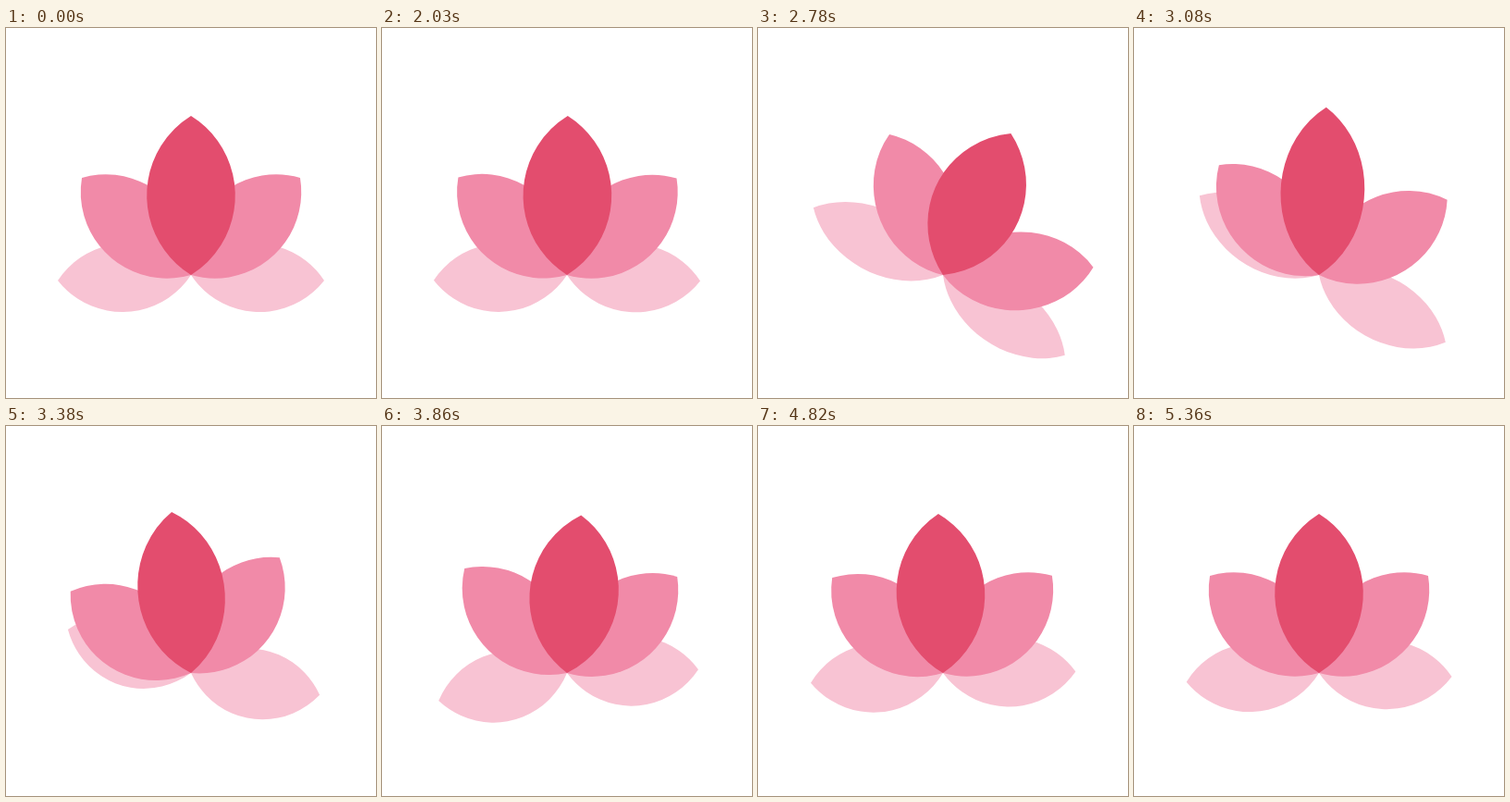
An HTML page with a canvas for the animation above (5390 ms loop, 400 by 400 pixels).

```html
<!DOCTYPE html>
<html lang="en">
<head>
<meta charset="utf-8">
<title>Lotus</title>
<style>
  html, body { margin: 0; width: 100%; height: 100%; overflow: hidden; background: #fff; }
  canvas { display: block; width: 400px; height: 400px; }
</style>
</head>
<body>
<canvas id="stage" width="400" height="400"></canvas>
<script>
const ctx = document.getElementById('stage').getContext('2d');
const LOOP = 5390, REST = 2030, STEP = 30;
const HEAD_START = 40, BEAT = 520, SETTLE = 900;
const BASE = { x: 200, y: 267 };

function ease(from, to, progress) {
  return from + (to - from) * (1 - Math.cos(Math.PI * progress)) / 2;
}

// One push to a peak, then a bounce that swings back and forth, fading to rest.
function swing({ peak, peakAt, bounce, bounceAt, decay, beat = BEAT }) {
  return time => {
    if (time < peakAt) return ease(0, peak, time / peakAt);
    if (time < bounceAt) return ease(peak, bounce, (time - peakAt) / (bounceAt - peakAt));
    const beats = (time - bounceAt) / beat;
    const count = Math.min(Math.floor(beats), 2);
    const from = bounce * (-decay) ** count;
    if (count < 2) return ease(from, -decay * from, beats - count);
    return ease(from, 0, Math.min(1, (beats - 2) * beat / SETTLE));
  };
}

const low = {
  color: '#f8c3d3', length: 144.1, bulge: 37,
  stretch: swing({ peak: 0.1, peakAt: 920, bounce: -0.04, bounceAt: 1540, decay: 0.4, beat: 700 })
};
const middle = {
  color: '#f18aa8', length: 158, bulge: 43.6,
  stretch: swing({ peak: 0.03, peakAt: 840, bounce: -0.005, bounceAt: 1440, decay: 0.3 })
};
const front = {
  color: '#e34d6e', length: 172, bulge: 47.8,
  stretch: swing({ peak: -0.03, peakAt: 660, bounce: 0.055, bounceAt: 1110, decay: 0.15 })
};

const petals = [
  { ...low, angle: -92.4,
    sway: swing({ peak: 36, peakAt: 1085, bounce: -10, bounceAt: 1900, decay: 0.52 }) },
  { ...low, angle: 92.4,
    sway: swing({ peak: 31.5, peakAt: 860, bounce: -5.3, bounceAt: 1740, decay: 0.75 }) },
  { ...middle, angle: -48.3,
    sway: swing({ peak: 28.5, peakAt: 720, bounce: -7.7, bounceAt: 1360, decay: 0.5 }) },
  { ...middle, angle: 48.3,
    sway: swing({ peak: 39.5, peakAt: 740, bounce: -10.8, bounceAt: 1390, decay: 0.07 }) },
  { ...front, angle: 0,
    sway: swing({ peak: 29, peakAt: 660, bounce: -7.4, bounceAt: 1320, decay: 0.7 }) }
];

function drawPetal({ color, length, bulge, angle, sway, stretch }, time) {
  const half = length / 2;
  const radius = (half * half + bulge * bulge) / (2 * bulge);
  const offset = radius - bulge;
  const spread = Math.asin(half / radius);
  const scale = 1 + stretch(time);

  ctx.save();
  ctx.translate(BASE.x, BASE.y);
  ctx.rotate((angle + sway(time)) * Math.PI / 180);
  ctx.scale(1 / scale, scale);
  ctx.beginPath();
  ctx.arc(-offset, -half, radius, -spread, spread);
  ctx.arc(offset, -half, radius, Math.PI - spread, Math.PI + spread);
  ctx.closePath();
  ctx.fillStyle = color;
  ctx.fill();
  ctx.restore();
}

function render(now) {
  const elapsed = Math.floor((now % LOOP - REST) / STEP) * STEP;
  const time = elapsed < 0 ? 0 : elapsed + HEAD_START;
  ctx.fillStyle = '#fff';
  ctx.fillRect(0, 0, 400, 400);
  petals.forEach(petal => drawPetal(petal, time));
}

function tick() {
  render(performance.now());
  requestAnimationFrame(tick);
}
tick();
</script>
</body>
</html>
```
